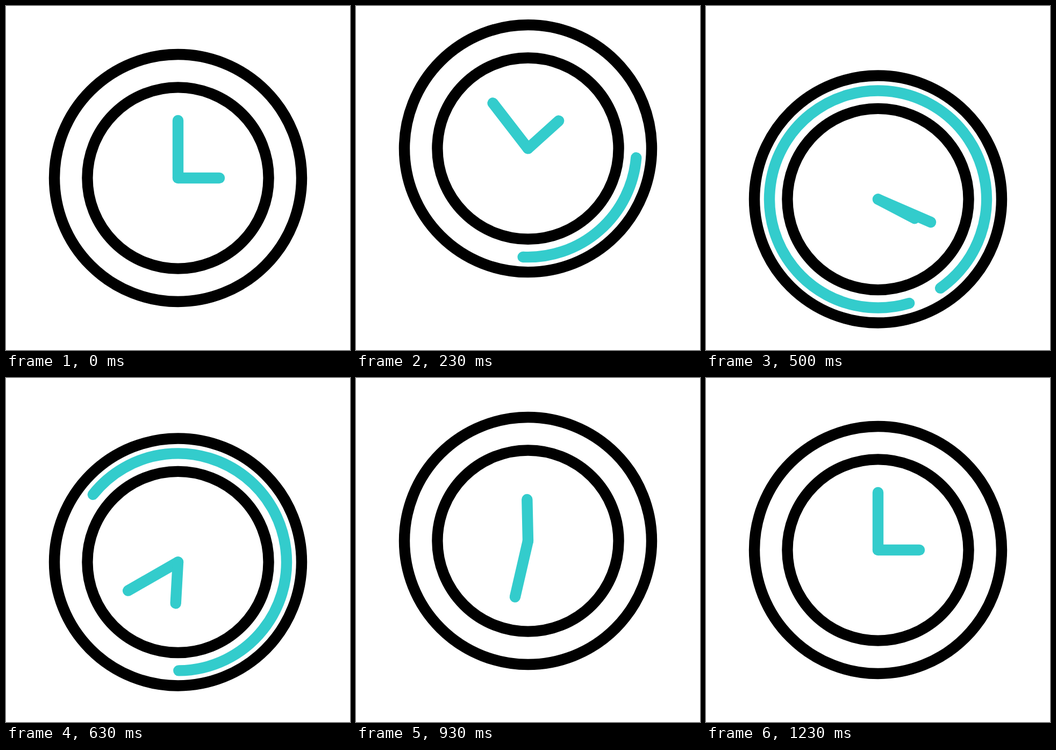
Write an HTML page that moves like this. It is 640 by 640 pixels and loops after 1670 ms.

```html
<!DOCTYPE html>
<html lang="en">
<head>
<meta charset="utf-8">
<title>Clock</title>
<style>
  html, body { margin: 0; width: 100%; height: 100%; overflow: hidden; background: #fff; }
  svg { display: block; width: 100vw; height: 100vh; }
  g { fill: none; stroke: #000; stroke-width: 20.4; stroke-linecap: round; }
  .accent { stroke: #3cc; }
</style>
</head>
<body>
<svg viewBox="0 0 640 640">
  <g id="clock" transform="translate(320 320)">
    <circle r="230"/>
    <circle r="168.6"/>
    <circle id="arc" class="accent" r="202" pathLength="360" visibility="hidden"/>
    <path id="minute" class="accent" d="M0 0V-107"/>
    <path id="hour" class="accent" d="M0 0V-77" transform="rotate(90)"/>
  </g>
</svg>
<script>
  const LOOP = 1670;
  const [clock, arc, minute, hour] =
    ['clock', 'arc', 'minute', 'hour'].map(id => document.getElementById(id));

  // Bezier easing with flat ends: handles (x1, 0) and (x2, 1)
  const bezier = (x1, x2) => x => {
    let lo = 0, hi = 1;
    for (let i = 0; i < 30; i++) {
      const s = (lo + hi) / 2, r = 1 - s;
      if (3 * r * r * s * x1 + 3 * r * s * s * x2 + s * s * s < x) lo = s;
      else hi = s;
    }
    return lo * lo * (3 - 2 * lo);
  };
  const smooth = x => x * x * (3 - 2 * x);
  const easeInOut = bezier(.42, .58);

  // Keys are [tick, value, easing into this key]
  const track = (...keys) => n => {
    const i = keys.findIndex(k => k[0] > n);
    if (i < 0) return keys[keys.length - 1][1];
    if (i === 0) return keys[0][1];
    const [t0, v0] = keys[i - 1], [t1, v1, ease] = keys[i];
    return v0 + (v1 - v0) * ease((n - t0) / (t1 - t0));
  };

  const bob = track([0, 0], [8, -56.6, easeInOut], [16, 42.6, easeInOut],
                    [24.1, -28, easeInOut], [33, 0, easeInOut]);
  const minuteTurn = track([0, 0], [5, -45, easeInOut], [37, 720, bezier(.364, .7)]);
  const hourTurn = track([0, 90], [5, 45, easeInOut], [37, 450, bezier(.425, .685)]);
  const trimEnd = track([2.97, 0], [15.5, 360, smooth]);
  const trimStart = track([13.1, 0], [27.7, 360, smooth]);
  const arcTurn = track([4.25, 0], [28.25, 134, smooth]);

  const rotate = (el, deg) => el.setAttribute('transform', `rotate(${deg.toFixed(3)})`);

  function draw(n) {
    const start = trimStart(n), length = trimEnd(n) - start;
    clock.setAttribute('transform', `translate(320 ${(320 + bob(n)).toFixed(3)})`);
    rotate(minute, minuteTurn(n));
    rotate(hour, hourTurn(n));
    rotate(arc, arcTurn(n) + start);
    arc.setAttribute('stroke-dasharray', `${length.toFixed(3)} 400`);
    arc.setAttribute('visibility', length > .01 ? 'visible' : 'hidden');
  }

  // 30 ticks per second, each starting on a 10 ms boundary
  const tickAt = ms => Math.floor((Math.floor(ms / 10) + .34) * .3);

  const begin = performance.now();
  function play() {
    draw(tickAt((performance.now() - begin) % LOOP));
    requestAnimationFrame(play);
  }
  play();
</script>
</body>
</html>
```
